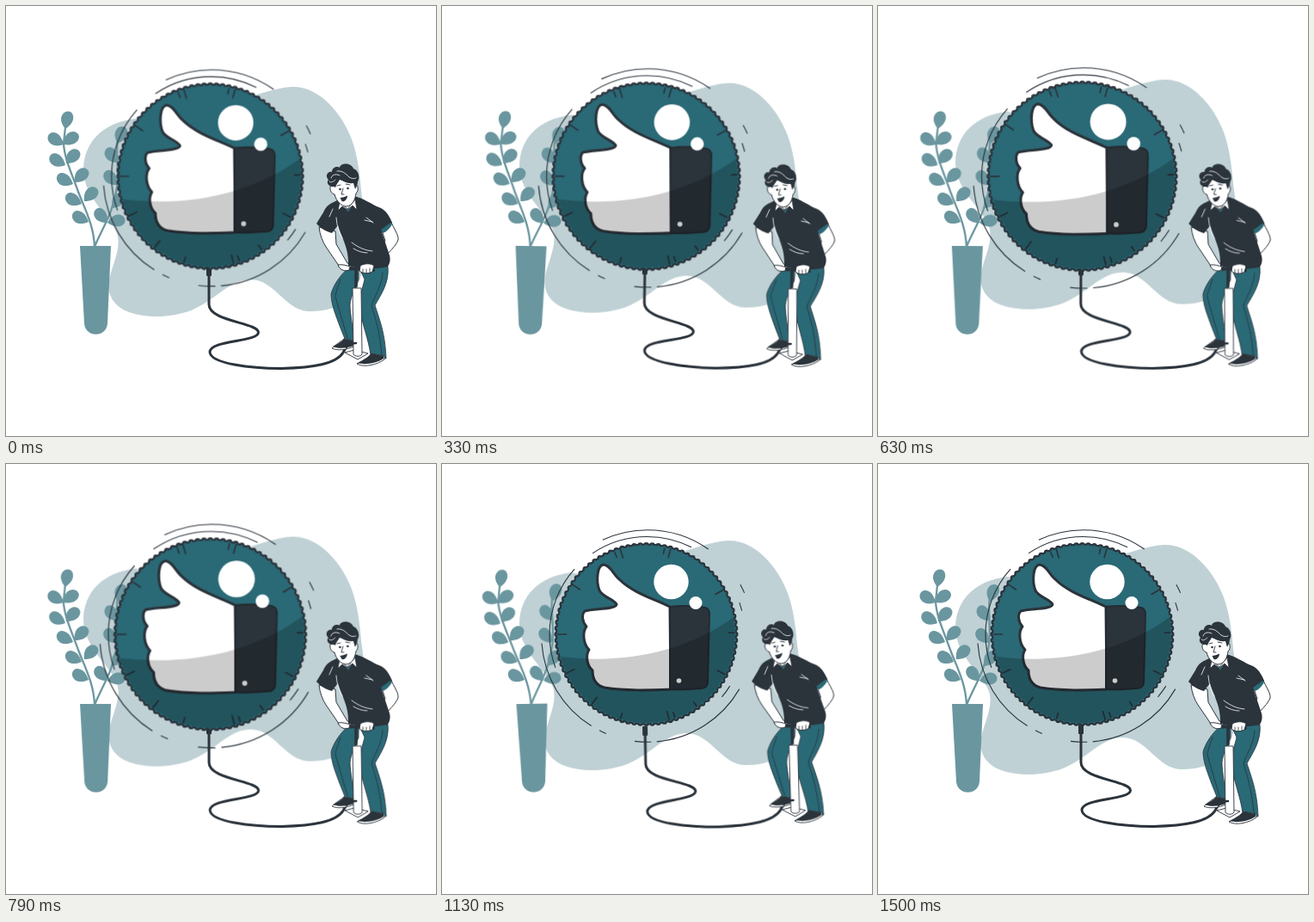
An HTML page without scripts for the animation above (1.54 s loop, 500 px wide and 500 px high).

```html
<!DOCTYPE html>
<html lang="en">
<head>
<meta charset="utf-8">
<title>Inflating a thumbs-up balloon</title>
<style>
  :root { --teal: #2a6976; --dark: #2b333b; --leaf: #6a969f; --mist: #bfd1d5; }
  html, body { margin: 0; width: 100%; height: 100%; overflow: hidden; background: #fff; }
  svg { display: block; width: 100vw; height: 100vh; }

  .blob, .sway, .balloon { animation: 1540ms linear infinite; }
  .blob { fill: var(--mist); animation-name: float; }
  .sway { animation-name: sway; }
  .plant { transform-origin: 95px 252px; }
  .man { transform-origin: 346px 302px; }
  .balloon { transform-origin: 237.5px 198px; animation-name: beat; }

  @keyframes float {
    0%, 97.4%, 100% { transform: translateY(0); }
    48.7% { transform: translateY(-10px); }
  }
  @keyframes sway {
    0%, 97.4%, 100% { transform: rotate(0deg); }
    24.35% { transform: rotate(1deg); }
    73.05% { transform: rotate(-1deg); }
  }
  @keyframes beat {
    0% { transform: scale(1.02); }
    7.92%, 46.88% { transform: scale(1.1); }
    27.4%, 37.14%, 56.62%, 100% { transform: scale(1); }
  }

  .plant { fill: var(--leaf); }
  .stem { fill: none; stroke: var(--leaf); stroke-width: 2.3; }
  .line { fill: none; stroke: var(--dark); stroke-linecap: round; stroke-linejoin: round; }
  .arc { fill: none; stroke: var(--dark); stroke-width: 1.1; }
  .dark { fill: var(--dark); }
  .teal { fill: var(--teal); }
  .skin { fill: #fff; stroke: var(--dark); stroke-linejoin: round; }
  .cloth { fill: var(--teal); stroke: var(--dark); stroke-width: .8; stroke-linejoin: round; }
  .crease { fill: none; stroke: #fff; stroke-width: .8; stroke-linecap: round; }
  .bumps { fill: none; stroke-linecap: round; stroke-dasharray: 0 1; }
</style>
</head>
<body>
<svg viewBox="0 0 500 500">
  <defs>
    <path id="leaf" d="M0 0C-4-3-9-9-7-15C-5-22 4-23 6-16C8-10 4-4 0 0Z"/>
    <path id="tick" d="M0-102V-96"/>
    <path id="long" d="M0-103V-93"/>
    <clipPath id="face"><circle cx="237.5" cy="198" r="103"/></clipPath>
  </defs>

  <path class="blob" d="M333 94C364 93 391 125 402 155C408 172 411 190 413 215C419 255 421 300 407 330C396 350 373 355 352 355C324 354 313 318 284 318C258 319 246 341 215 354C191 363 163 363 143 356C124 349 117 334 120 318C124 300 133 284 130 268C126 247 90 225 90 190C91 158 112 136 150 131C205 145 292 95 333 94Z"/>

  <g class="sway plant">
    <path class="stem" d="M103 280C102 255 92 237 84 216C77 196 68 178 67 160L69 141M103 280C112 258 125 240 129 211C132 190 127 172 130 156"/>
    <path d="M86 279H122L118 369C117 386 92 386 91 369Z"/>
    <use href="#leaf" transform="translate(69 143)rotate(12)"/>
    <g transform="translate(-1 0)">
      <use href="#leaf" transform="translate(68 161)rotate(-57)"/>
      <use href="#leaf" transform="translate(68 161)rotate(54)"/>
      <use href="#leaf" transform="translate(70 185)rotate(-59)"/>
      <use href="#leaf" transform="translate(71 183)rotate(45)"/>
      <use href="#leaf" transform="translate(79 207)rotate(-62)"/>
      <use href="#leaf" transform="translate(81 205)rotate(45)"/>
      <use href="#leaf" transform="translate(89 230)rotate(-62)"/>
      <use href="#leaf" transform="translate(92 227)rotate(45)"/>
      <use href="#leaf" transform="translate(97 251)rotate(-62)"/>
    </g>
    <use href="#leaf" transform="translate(118 252)rotate(-40)"/>
    <use href="#leaf" transform="translate(118 252)rotate(80)"/>
    <use href="#leaf" transform="translate(124 235)rotate(38)"/>
    <use href="#leaf" transform="translate(129 208)rotate(-40)"/>
    <use href="#leaf" transform="translate(130 182)rotate(-38)"/>
    <use href="#leaf" transform="translate(130 160)rotate(20)"/>
  </g>

  <g class="sway man">
    <rect class="dark" x="233" y="303" width="6" height="11" rx="1"/>
    <path class="line" stroke-width="3" d="M236 310V347C236 367 293 368 293.500 379.500C293 391 237 388 237 402.500C238 416 285 421.500 320 421.500C358 420.500 384 416 392 403C396 395 399 392 407 392"/>

    <!-- legs and pump -->
    <path class="skin" stroke-width=".9" d="M379 398C384 393 390 390 394 386L404 388V396C396 400 385 401 379 398Z"/>
    <path class="dark" d="M380 396C385 393 390 391 393 387L404 389V395C397 398 386 399 380 396Z"/>
    <path class="cloth" d="M399 304C388 313 380 326 378 335C378 347 384 361 388 372L394 387L404 389C404 375 400 358 400 347C401 337 406 328 410 318V305Z"/>
    <path class="cloth" d="M411 305L444 303C446 321 436 336 429 348C434 364 441 380 442 410L424 406C422 388 413 368 411 348C411 338 415 326 417 318Z"/>
    <path class="line" stroke-width=".8" d="M438 310C437 325 429 337 425 348C431 368 435 382 437 407M389 318C386 327 383 334 383 338L397 386"/>
    <path class="skin" stroke-width=".9" d="M394 403L405 400L421 404L409 411Z"/>
    <path class="skin" stroke-width=".9" d="M403 328H413L414 405C412 408 406 408 404 405Z"/>
    <path class="line" stroke-width="3.500" d="M407 307V326"/>
    <path class="line" stroke-width="2.500" d="M396 397C398 393 402 392 407 392"/>
    <path class="skin" stroke-width=".9" d="M408 416C416 412 422 408 425 404L440 407L440 411C432 417 416 421 408 416Z"/>
    <path class="dark" d="M409 415C417 411 422 408 425 404L439 407L439 410C432 415 417 418 409 415Z"/>

    <!-- arms -->
    <path class="skin" d="M364 257C365 266 368 274 372 280L387 302C389 307 396 307 402 307V302L397 299L384 277L383 262Z"/>
    <path class="skin" d="M448 251C450 258 457 266 456 272C453 281 437 294 427 304L421 300L441 273L437 261Z"/>

    <!-- shirt -->
    <path class="dark" d="M387 225C377 230 373 231 369 240L361 253C366 259 372 262 379 264L386 255C390 269 399 281 398 302C414 307 431 306 444 303C447 298 447 294 446 290L437 263C442 261 446 258 449 252C444 240 440 236 431 233C423 229 416 224 405 221Z"/>
    <path class="teal" d="M436 260L447 252L449 254C446 259 442 263 438 264Z"/>
    <path class="crease" d="M384 246C385 255 386 262 391 270M417 249L426 251M419 246L427 252M402 275C410 281 417 284 426 285M404 282C409 285 414 287 420 287M380 236L376 245"/>
    <path class="teal" d="M391 230L404 230L398 240Z"/>
    <path class="skin" d="M389 222L390 232L397 237L404 231L405 218Z"/>
    <path class="skin" stroke-width=".8" d="M388 228L386 238L391 233L397 237L403 232L408 237L406 225L397 236Z"/>

    <!-- head -->
    <path class="skin" d="M381 207C375 207 376 218 382 219C384 227 390 233 396 233C403 232 406 225 407 218C411 214 409 207 406 207L402 198H383Z"/>
    <path class="dark" d="M381 210C375 211 372 205 375 202C370 197 375 192 379 193C379 187 386 186 388 188C389 182 401 182 404 189C410 191 412 200 409 204C409 208 407 211 406 213L404 206C396 207 392 203 388 202C386 206 384 207 383 211Z"/>
    <path class="crease" d="M378 200C380 194 386 196 388 197M385 192C391 191 395 195 399 199C402 201 405 201 407 200M376 204C378 206 381 204 383 202"/>
    <circle class="dark" cx="388.500" cy="213" r="1.300"/>
    <circle class="dark" cx="397.500" cy="212" r="1.300"/>
    <path class="line" stroke-width=".9" d="M385 209L389 208M395 207L400 208M392 212L390 219L393 219"/>
    <path class="dark" d="M388.500 223C391 223 394 222 397 220.500C397 225 393 228.500 390.500 227Z"/>

    <!-- handle and hands -->
    <path class="line" stroke-width="4" d="M399 305L427 307"/>
    <path class="skin" d="M386 301C391 300 397 302 400 303L399 307C394 309 388 307 386 301Z"/>
    <path class="skin" d="M412 302C417 299 424 299 428 302L426 309C421 312 414 311 411 308Z"/>
    <path class="line" stroke-width=".8" d="M415 306L415 310M419 306L419 311M423 305L423 310"/>
  </g>

  <g class="balloon">
    <circle class="arc" cx="239" cy="200" r="123.300" pathLength="360" stroke-dasharray="0 30 55 3 9 16 4 5 54 69 60 26 5 24"/>
    <circle class="arc" cx="238.500" cy="198" r="113.500" pathLength="360" stroke-dasharray="0 32 8 120 62 14 61 44 5 14"/>

    <g transform="translate(237.500 198)">
      <circle class="dark" r="105.500"/>
      <circle class="bumps" r="103.800" pathLength="92" stroke="#2b333b" stroke-width="6.400"/>
      <circle class="teal" r="103.400"/>
      <circle class="bumps" r="103.400" pathLength="92" stroke="#2a6976" stroke-width="2.600"/>
      <g class="line" stroke-width="1.600">
        <use href="#tick" transform="rotate(-21)"/>
        <use href="#long" transform="rotate(-17)"/>
        <use href="#tick" transform="rotate(12)"/>
        <use href="#long" transform="rotate(16)"/>
        <use href="#long" transform="rotate(60)"/>
        <use href="#tick" transform="rotate(89)"/>
        <use href="#long" transform="rotate(117)"/>
        <use href="#tick" transform="rotate(145)"/>
        <use href="#tick" transform="rotate(161)"/>
        <use href="#long" transform="rotate(165)"/>
        <use href="#tick" transform="rotate(197)"/>
        <use href="#long" transform="rotate(218)"/>
        <use href="#long" transform="rotate(244)"/>
        <use href="#long" transform="rotate(270)"/>
        <use href="#long" transform="rotate(304)"/>
      </g>
    </g>

    <path class="skin" stroke-width="3" d="M265 166C247 157 222 150 206 134C199 128 196 118 188 117C180 118 179 136 183 147C187 155 198 156 203 163C203 169 177 168 166 171C162 175 163 184 168 189C163 195 164 209 171 216C167 222 168 234 175 240C175 247 177 257 189 260C214 264 241 263 266 262Z"/>
    <path class="dark" stroke="#252b31" stroke-width="2" d="M265 166C280 164 294 165 306 167C310 168 311 171 311 175L309 255C308 259 305 261 301 261C289 262 277 263 265 262Z"/>
    <path clip-path="url(#face)" opacity=".2" d="M130 223C205 234 285 221 346 173V306H130Z"/>
    <circle cx="275.500" cy="252" r="2.800" fill="#ccc"/>
    <circle cx="266.500" cy="137" r="20.200" fill="#fff"/>
    <circle cx="295" cy="161.500" r="7.500" fill="#fff"/>
  </g>
</svg>
</body>
</html>
```
